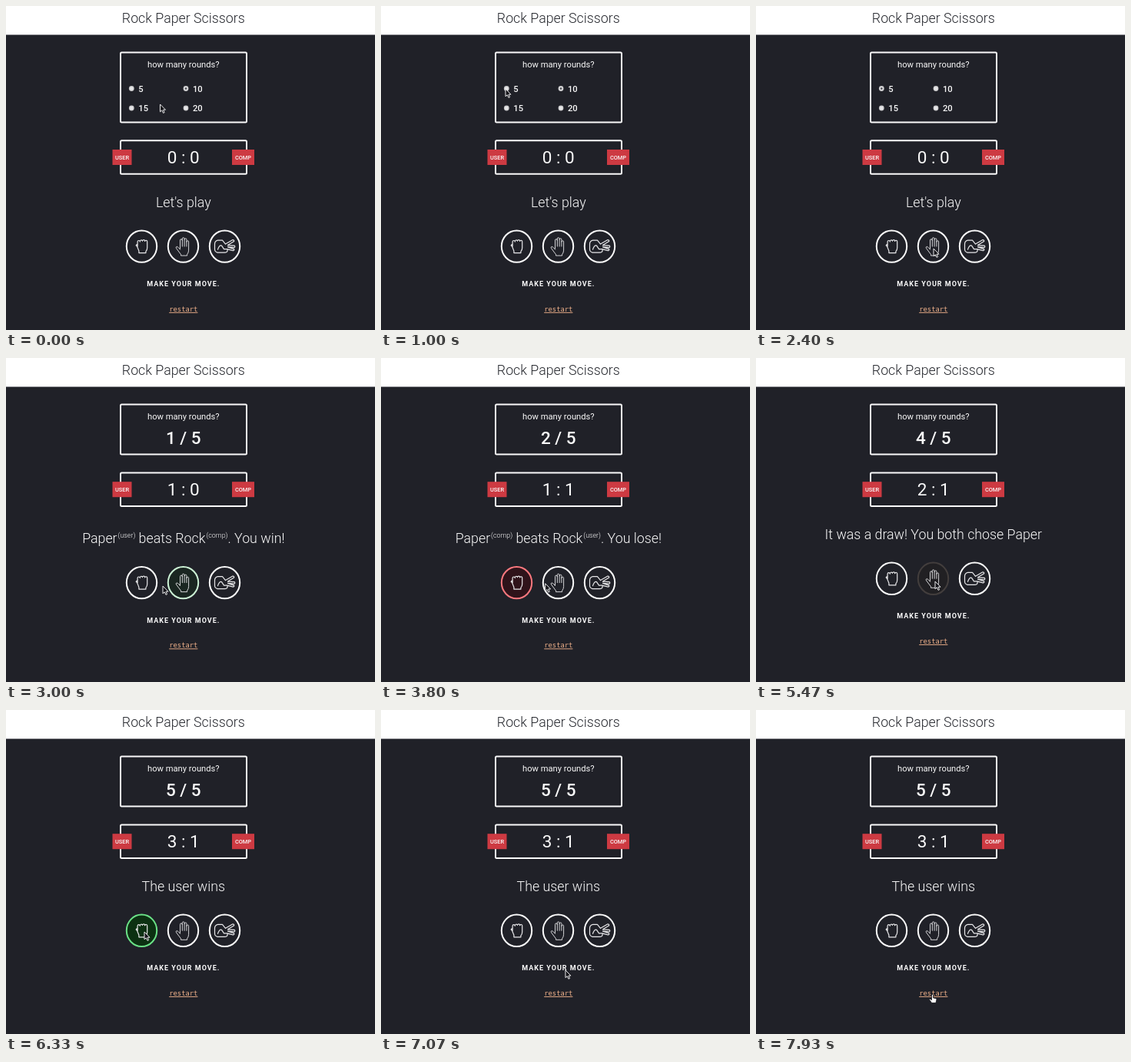
An HTML page with a canvas for the animation above (8000 ms loop, 480 by 422 pixels).

```html
<!DOCTYPE html>
<html lang="en">
<head>
<meta charset="utf-8">
<title>Rock Paper Scissors</title>
<style>
html, body { margin: 0; width: 100%; height: 100%; overflow: hidden; background: #202128; }
canvas { display: block; width: 480px; height: 422px; }
</style>
</head>
<body>
<canvas id="stage"></canvas>
<script>
const W = 480, H = 422, LOOP = 8000, MID = 230.8;
const BG = [32, 33, 40], WHITE = [250, 250, 250];
const SANS = 'Roboto, sans-serif';
const canvas = document.getElementById('stage');
const ctx = canvas.getContext('2d');
const dpr = window.devicePixelRatio || 1;
canvas.width = W * dpr;
canvas.height = H * dpr;

const ICONS = [
  'M-7.2-1a1.5 1.5 0 0 1 1.8-1.6V-6a1.6 1.6 0 0 1 3.2 0a1.6 1.6 0 0 1 3.2-1a1.6 1.6 0 0 1 3.2 .4a1.5 1.5 0 0 1 3 .6V2q0 3-1.8 4.5V8.5H-3.6V6Q-7-3-7.2-1zM-5.4-2.6V0',
  'M-4 3V-8a1.4 1.4 0 0 1 2.8 0V0M-1.2-8V-10a1.4 1.4 0 0 1 2.8 0V0M1.6-9a1.4 1.4 0 0 1 2.8 0V0M4.4-6a1.3 1.3 0 0 1 2.7 0V5q0 3-2 5.5V12H-3V10.5L-9 2.5q-1-2 .8-2.2q1.4 0 4.2 3.7',
  'M1-3L10.5-8.5q2 0 1.6 2L4-1.5L12.5-1q1.5 1 0 2.5L4 .8L12 3.5q1 1.5-1 2L3 3.5M1-3L-3-8H-9q-4 1-4 5V4q0 3 3.5 4H0q3 0 3.5-2V3.5M-9 4Q-7-2-4-1L-1 3.5H3'
].map(d => new Path2D(d));
const ARROW = new Path2D('M0 0V9.8L2.3 7.8L4 11.4L5.6 10.7L4 7.2H7z');
const HAND = new Path2D('M-1 0a1 1 0 0 1 2 0V3.4L4.6 4.2q1 .4 .8 1.6L4.4 10H-.8L-4 5.8q0-1.4 1.4-.8L-1 6.2z');

const GLOWS = {
  win: { line: [77, 220, 110], fill: [8, 52, 14] },
  lose: { line: [252, 30, 40], fill: [58, 10, 16] },
  draw: { line: [66, 61, 60], fill: [33, 32, 35] }
};

// Words starting with "(" are set as superscripts.
const ROUNDS = [
  { at: 2600, pick: 1, glow: 'win', score: '1 : 0', msg: ['Paper', '(user)', ' beats Rock', '(comp)', '. You win!'] },
  { at: 3470, pick: 0, glow: 'lose', score: '1 : 1', msg: ['Paper', '(comp)', ' beats Rock', '(user)', '. You lose!'] },
  { at: 4330, pick: 2, glow: 'win', score: '2 : 1', msg: ['Scissors', '(user)', ' beats Paper', '(comp)', '. You win!'] },
  { at: 5200, pick: 1, glow: 'draw', score: '2 : 1', msg: ['It was a draw! You both chose Paper'] },
  { at: 6200, pick: 0, glow: 'win', score: '3 : 1', msg: ['The user wins'] }
];

// Pointer stops: time, x, y
const STOPS = [
  [30, 200.5, 128], [960, 162, 108], [1690, 162, 108], [2000, 240, 279],
  [2150, 240, 279], [2400, 231, 316], [2600, 231, 316], [3000, 204, 297],
  [3270, 179, 293], [3560, 179, 293], [4230, 296.5, 295.5], [4530, 296.5, 295.5],
  [4980, 233, 291], [5480, 233, 291], [5980, 180, 289], [6450, 180, 289],
  [7030, 240, 338], [7420, 238, 366], [7880, 229.5, 371.5]
];

const smooth = x => x * x * (3 - 2 * x);
const easeOut = x => 1 - Math.pow(1 - Math.max(0, Math.min(1, x)), 2.3);
const rgb = c => `rgb(${c.map(Math.round).join(',')})`;
const mix = (a, b, k) => a.map((v, i) => v + (b[i] - v) * k);

function pointerAt(t) {
  const i = STOPS.findIndex(s => s[0] > t);
  if (i === 0) return STOPS[0].slice(1);
  if (i < 0) return STOPS[STOPS.length - 1].slice(1);
  const [t0, x0, y0] = STOPS[i - 1], [t1, x1, y1] = STOPS[i];
  const k = smooth((t - t0) / (t1 - t0));
  return [x0 + (x1 - x0) * k, y0 + (y1 - y0) * k];
}

function text(str, x, y, size, weight = 400, color = '#fafafa', align = 'center', family = SANS) {
  ctx.font = `${weight} ${size}px ${family}`;
  ctx.fillStyle = color;
  ctx.textAlign = align;
  ctx.fillText(str, x, y);
}

function frameBox(y, h) {
  ctx.strokeStyle = rgb(WHITE);
  ctx.lineWidth = 2;
  ctx.beginPath();
  ctx.roundRect(149, y + 1, 164, h - 2, 1.5);
  ctx.stroke();
}

function badge(label, x, w, y) {
  ctx.fillStyle = '#cd3a42';
  ctx.fillRect(x, y - 10, w, 20);
  text(label, x + w / 2, y + 2.8, 7.4, 500);
}

function disc(x, y, r, color) {
  ctx.fillStyle = color;
  ctx.beginPath();
  ctx.arc(x, y, r, 0, 7);
  ctx.fill();
}

function radio(label, x, y, on) {
  disc(x, y, 3.4, '#c9c9cb');
  disc(x, y, 2.3, '#e6e6e8');
  if (on) disc(x, y, 1.3, '#45464c');
  text(label, x + 9, y + 4, 11.2, 500, '#fafafa', 'left');
}

function message(parts, y) {
  const big = 17.8;
  const sized = parts.map(str => {
    const sup = str[0] === '(';
    const size = sup ? big / 2 : big;
    ctx.font = `300 ${size}px ${SANS}`;
    return { str, size, dy: sup ? -7 : 0, w: ctx.measureText(str).width + (sup ? 1 : 0) };
  });
  let x = MID - sized.reduce((sum, p) => sum + p.w, 0) / 2;
  for (const p of sized) {
    text(p.str, x + (p.dy ? 1 : 0), y + p.dy, p.size, 300, '#fafafa', 'left');
    x += p.w;
  }
}

function choice(i, y, glow, k) {
  const x = 176.5 + 54 * i;
  const line = glow ? mix(WHITE, glow.line, k) : WHITE;
  ctx.beginPath();
  ctx.ellipse(x, y, 19.7, 20.7, 0, 0, 7);
  ctx.fillStyle = rgb(glow ? mix(BG, glow.fill, k) : BG);
  ctx.fill();
  ctx.strokeStyle = rgb(line);
  ctx.lineWidth = 2;
  ctx.stroke();
  ctx.save();
  ctx.translate(x, y);
  ctx.strokeStyle = '#e8e8ea';
  ctx.lineWidth = [1.2, 0.9, 1.2][i];
  ctx.lineJoin = ctx.lineCap = 'round';
  ctx.stroke(ICONS[i]);
  ctx.restore();
}

function pointer(t) {
  const [x, y] = pointerAt(t);
  const onLink = t > 7000 && y > 362;
  ctx.save();
  ctx.translate(x, y);
  ctx.lineJoin = 'round';
  ctx.lineWidth = onLink ? 0.8 : 1;
  ctx.fillStyle = onLink ? '#fff' : '#15151a';
  ctx.strokeStyle = onLink ? '#15151a' : '#e9e9ea';
  const shape = onLink ? HAND : ARROW;
  ctx.fill(shape);
  ctx.stroke(shape);
  ctx.restore();
}

function draw(t) {
  const played = ROUNDS.filter(r => r.at <= t).length;
  const round = ROUNDS[played - 1];
  const scoreY = round ? 171.2 : 197;
  const lineY = !round ? 261.5 : round.msg.length > 1 ? 241 : 235.7;
  const rowY = lineY + 51.6;

  ctx.setTransform(dpr, 0, 0, dpr, 0, 0);
  ctx.fillStyle = rgb(BG);
  ctx.fillRect(0, 0, W, H);
  ctx.fillStyle = '#fff';
  ctx.fillRect(0, 0, W, 37.5);
  text('Rock Paper Scissors', MID, 22.3, 17.8, 300, '#26282e');

  frameBox(59.5, round ? 67 : 93);
  text('how many rounds?', MID, 79.7, 11.2, 400);
  if (round) {
    text(`${played} / 5`, MID, 111.5, 22.5, 500);
  } else {
    const five = t >= 1400;
    radio('5', 163.3, 107.5, five);
    radio('10', 234, 107.5, !five);
    radio('15', 163.3, 133, false);
    radio('20', 234, 133, false);
  }

  frameBox(scoreY - 22.7, 45.4);
  badge('USER', 138.5, 25, scoreY);
  badge('COMP', 294, 29, scoreY);
  text(round ? round.score : '0 : 0', MID, scoreY + 7.9, 22.5);

  message(round ? round.msg : ["Let's play"], lineY);

  const age = round ? t - round.at + 30 : 0;
  const k = age < 300 ? easeOut(age / 300) : 1 - easeOut((age - 300) / 300);
  for (let i = 0; i < 3; i++) {
    choice(i, rowY, round && round.pick === i ? GLOWS[round.glow] : null, k);
  }

  ctx.letterSpacing = '1px';
  text('MAKE YOUR MOVE.', MID, rowY + 52, 9, 700);
  ctx.letterSpacing = '0px';
  const linkY = rowY + 84.8;
  text('restart', MID, linkY, 8.8, 400, '#f3b48c', 'center', '"DejaVu Sans Mono", monospace');
  ctx.fillRect(MID - 18.6, linkY + 1, 37.2, 0.9);

  pointer(t);
}

const start = performance.now();
function tick() {
  draw((performance.now() - start) % LOOP);
  requestAnimationFrame(tick);
}
tick();
</script>
</body>
</html>
```
